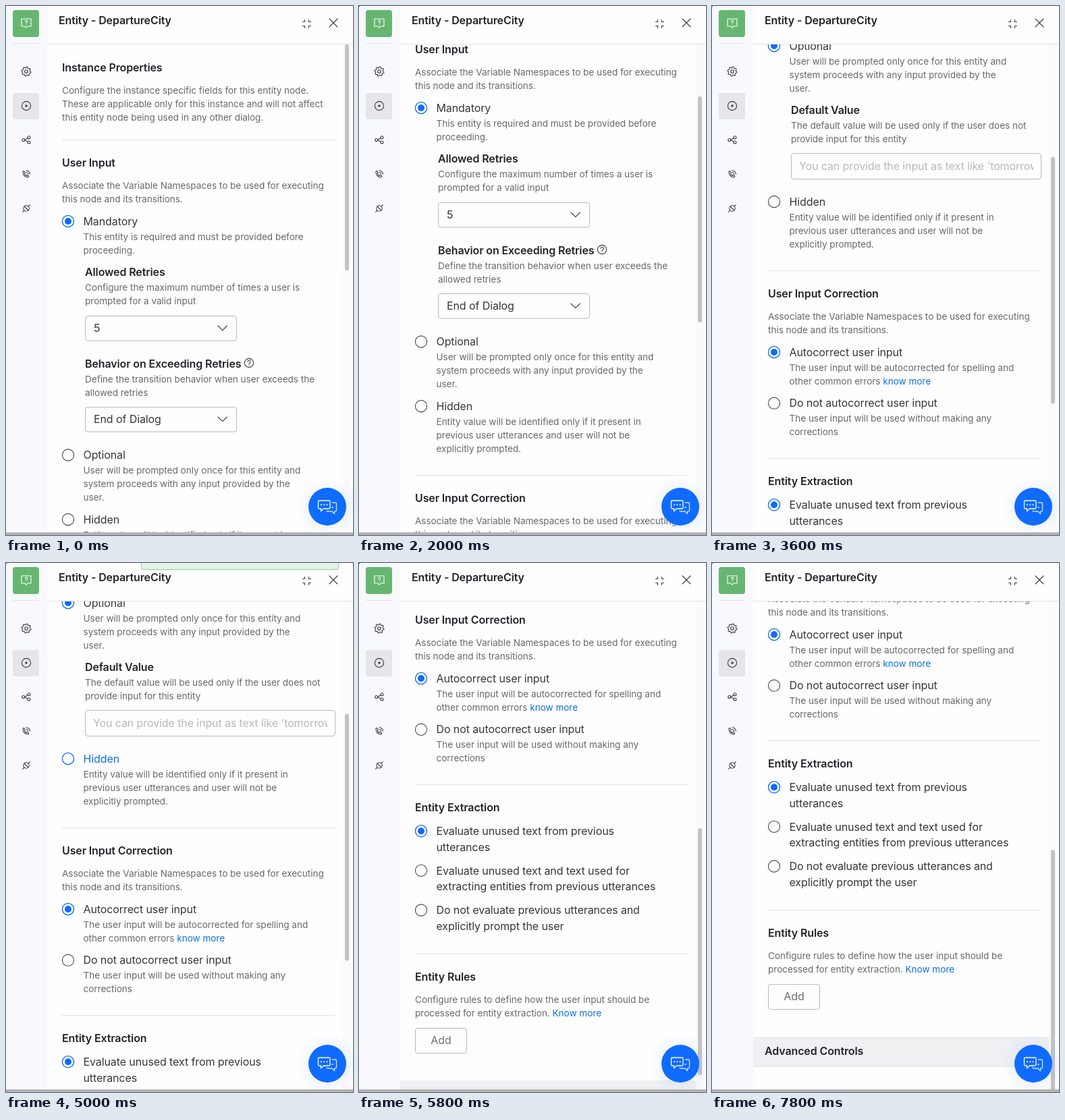
These frames come from a looping animation (514 by 784 pixels, 8 s). An HTML page:

```html
<!DOCTYPE html>
<html lang="en">
<head>
<meta charset="utf-8">
<title>Entity settings</title>
<style>
html, body { margin: 0; width: 100%; height: 100%; overflow: hidden; background: #fefefe; }
svg { display: block; width: 514px; height: 784px; }
text { font-family: Inter, "Open Sans", sans-serif; font-optical-sizing: none; white-space: pre; }
.head { font-size: 16px; font-weight: 600; letter-spacing: -.12px; fill: #232328; }
.label { font-size: 16px; letter-spacing: -.1px; fill: #36363b; }
.note { font-size: 13.6px; letter-spacing: -.045px; fill: #68686d; }
.hint { fill: #b8b8bb; }
.link { fill: #0d6fe8; }
.rule { stroke: #e2e2e5; }
.box { fill: #fefefe; stroke: #b9b9bd; }
.line { fill: none; stroke: #3b3b40; stroke-width: 1.1; stroke-linecap: round; stroke-linejoin: round; }
.ring { fill: #fefefe; stroke: #48484e; stroke-width: 1.1; }
.dot { fill: #0f6bff; visibility: hidden; }
.on .dot { visibility: visible; }
.on .ring, .hover .ring { stroke: #0f6bff; stroke-width: 1.3; }
.hover .label { fill: #0d6fe8; }
</style>
</head>
<body>
<svg id="stage" viewBox="0 0 514 784">
  <defs>
    <clipPath id="view"><rect x="61" y="57" width="453" height="723"/></clipPath>
    <clipPath id="field"><rect x="125" y="554" width="351" height="42"/></clipPath>
    <radialGradient id="glow">
      <stop offset=".55" stop-color="#3c82ff" stop-opacity=".07"/>
      <stop offset="1" stop-color="#3c82ff" stop-opacity="0"/>
    </radialGradient>
  </defs>
  <rect width="514" height="784" fill="#fefefe"/>
  <rect width="61" height="784" fill="#f8f9fd"/>
  <g clip-path="url(#view)">
    <g id="content"></g>
    <rect x="499" y="57" width="12" height="723" fill="#fafafa"/>
    <rect id="thumb" x="502" width="6" rx="3" fill="#c3c3c4"/>
  </g>
  <g id="side"></g>
  <g id="header"></g>
  <rect y="780" width="514" height="4" fill="#b4b4b6"/>
  <g id="chat"></g>
  <g id="toast">
    <rect x="199" y="-20" width="296" height="32" rx="4" fill="#5bb878" opacity=".1"/>
    <rect x="200.5" y="-20" width="292" height="29.5" rx="3" fill="#e3f5e7" stroke="#8ed3a0"/>
  </g>
  <rect id="speck" width="1" height="1" fill="#000"/>
</svg>
<script>
const LOOP = 8000;
const $ = id => document.getElementById(id);

function add(parent, tag, attrs = {}, text) {
  const el = document.createElementNS("http://www.w3.org/2000/svg", tag);
  for (const key in attrs) el.setAttribute(key, attrs[key]);
  if (text) el.textContent = text;
  return parent.appendChild(el);
}

const group = (parent, attrs) => add(parent, "g", attrs);
const line = (parent, d, attrs = {}) => add(parent, "path", { class: "line", d, ...attrs });

// Text is placed by the vertical middle of its capitals.
function write(parent, kind, x, mid, text) {
  return add(parent, "text", { class: kind, x, y: mid + (kind === "note" ? 5 : 5.7) }, text);
}

function notes(parent, x, mid, ...rows) {
  return rows.map((row, i) => write(parent, "note", x, mid + i * 20.2, row)).pop();
}

const link = (row, text) => add(row, "tspan", { class: "link" }, text);
const rule = (parent, y) => add(parent, "path", { class: "rule", d: `M83 ${y + .5}H487.5` });

function box(parent, x, y, width, height) {
  add(parent, "rect", { class: "box", x: x + .5, y: y + .5, width, height, rx: 3.5 });
}

function select(parent, y, text) {
  box(parent, 117, y, 224, 36.5);
  write(parent, "label", 130, y + 18.3, text);
  line(parent, `M314 ${y + 15}l6.7 6.7l6.7 -6.7`);
}

function radio(parent, y, ...rows) {
  const g = group(parent);
  add(g, "circle", { class: "ring", cx: 92, cy: y, r: 8.6 });
  add(g, "circle", { class: "dot", cx: 92, cy: y, r: 5 });
  rows.forEach((row, i) => write(g, "label", 114.5, y + i * 23.8, row));
  return g;
}

// Scrolled content
const content = $("content");
write(content, "head", 83, 91, "Instance Properties");
notes(content, 83, 124.5, "Configure the instance specific fields for this entity node.",
  "These are applicable only for this instance and will not affect",
  "this entity node being used in any other dialog.");
rule(content, 198);
write(content, "head", 83, 232, "User Input");
notes(content, 83, 266, "Associate the Variable Namespaces to be used for executing",
  "this node and its transitions.");
const mandatory = radio(content, 319, "Mandatory");
notes(content, 114.5, 342, "This entity is required and must be provided before", "proceeding.");

const retries = group(content);
write(retries, "head", 117, 394, "Allowed Retries");
notes(retries, 117, 417, "Configure the maximum number of times a user is", "prompted for a valid input");
select(retries, 459, "5");
write(retries, "head", 117, 530, "Behavior on Exceeding Retries");
add(retries, "circle", { class: "line", cx: 360, cy: 529, r: 6.6 });
line(retries, "M358 527.4a2.1 2.1 0 1 1 3 1.9q-1 .5 -1 1.6M360 532.6v.1");
notes(retries, 117, 552.5, "Define the transition behavior when user exceeds the", "allowed retries");
select(retries, 594, "End of Dialog");

const option = group(content);
const optional = radio(option, 665.5, "Optional");
notes(option, 114.5, 688, "User will be prompted only once for this entity and",
  "system proceeds with any input provided by the", "user.");

const preset = group(content);
write(preset, "head", 117, 490, "Default Value");
notes(preset, 117, 513, "The default value will be used only if the user does not",
  "provide input for this entity");
box(preset, 117, 554, 370, 38);
write(group(preset, { "clip-path": "url(#field)" }), "label hint", 129, 573.5,
  "You can provide the input as text like 'tomorrow'");

const tail = group(content);
const hidden = radio(tail, 761, "Hidden");
notes(tail, 114.5, 784, "Entity value will be identified only if it present in",
  "previous user utterances and user will not be", "explicitly prompted.");
rule(tail, 863);
write(tail, "head", 83, 897.5, "User Input Correction");
notes(tail, 83, 931, "Associate the Variable Namespaces to be used for executing",
  "this node and its transitions.");
radio(tail, 984, "Autocorrect user input").classList.add("on");
link(notes(tail, 114.5, 1006.5, "The user input will be autocorrected for spelling and",
  "other common errors "), "know more");
radio(tail, 1059.7, "Do not autocorrect user input");
notes(tail, 114.5, 1082, "The user input will be used without making any", "corrections");
rule(tail, 1141);
write(tail, "head", 83, 1175, "Entity Extraction");
radio(tail, 1210.3, "Evaluate unused text from previous", "utterances").classList.add("on");
radio(tail, 1268.8, "Evaluate unused text and text used for",
  "extracting entities from previous utterances");
radio(tail, 1327.5, "Do not evaluate previous utterances and", "explicitly prompt the user");
rule(tail, 1392);
write(tail, "head", 83, 1426, "Entity Rules");
link(notes(tail, 83, 1460, "Configure rules to define how the user input should be",
  "processed for entity extraction. "), "Know more");
box(tail, 83, 1502, 76, 37);
write(tail, "label", 121.5, 1520.5, "Add").setAttribute("style", "text-anchor:middle;fill:#707075");
add(tail, "rect", { x: 61, y: 1580, width: 438, height: 45, fill: "#f0f0f3" });
add(tail, "path", { class: "rule", d: "M61 1624.5H499" });
write(tail, "head", 78, 1601.3, "Advanced Controls");

// Header
const header = $("header");
write(header, "head", 78, 21.3, "Entity - DepartureCity");
add(header, "path", { class: "rule", d: "M61 56.5H514" });
line(header, "M439.5 23.5h3v-3M451.5 23.5h-3v-3M439.5 29.5h3v3M451.5 29.5h-3v3");
line(header, "M479 19l12 12M491 19l-12 12");

// Side icons
const side = $("side");
add(side, "rect", { x: 10, y: 6, width: 39, height: 40, rx: 4, fill: "#66b671" });
line(side, "M23 19h14v11h-5l-2 2.5l-2 -2.5h-5zM28.6 22.8a1.5 1.5 0 1 1 2.1 1.4q-.7 .3 -.7 1.2M30 27.5v.1",
  { style: "stroke:#fff" });
add(side, "path", { class: "rule", d: "M10 55.5H49" });

function gear(cx, cy) {
  const points = [];
  for (let i = 0; i < 32; i++) {
    const angle = (i + .5) * Math.PI / 16;
    const r = i % 4 < 2 ? 7 : 5.4;
    points.push(`${cx + r * Math.cos(angle)},${cy + r * Math.sin(angle)}`);
  }
  add(side, "polygon", { class: "line", points: points.join(" ") });
  add(side, "circle", { class: "line", cx, cy, r: 2.3 });
}
gear(30, 97);
add(side, "rect", { x: 10, y: 129, width: 39, height: 39, rx: 3, fill: "#e5e5ea" });
add(side, "circle", { class: "line", cx: 30, cy: 148, r: 6.6 });
add(side, "circle", { cx: 30, cy: 148, r: 1.7, fill: "#3b3b40" });
for (const [cx, cy] of [[25.8, 198.5], [34, 194.8], [34, 202]])
  add(side, "circle", { class: "line", cx, cy, r: 2 });
line(side, "M27.8 198q2.5 -.3 4.2 -2.6M27.8 199q2.5 .3 4.2 2.4");
// phone
line(side, "M25 245.3l1.7 -.9l1.5 2.6l-1 1.3q.9 2.2 2.7 3.2l1.3 -1l2.5 1.5l-.9 1.9q-7.8 -.3 -7.8 -8.6z");
line(side, "M30 246.5q2.4 .1 2.7 2.8M30 243.7q5 .3 5.4 5.6");
// plug
add(side, "circle", { class: "line", cx: 30, cy: 300, r: 4.2 });
line(side, "M27 297l6 6M27 303l-2.4 2.4M33 297l2.4 -2.4");

// Chat button
const chat = $("chat");
add(chat, "circle", { cx: 476, cy: 743, r: 47, fill: "url(#glow)" });
add(chat, "circle", { cx: 476, cy: 742, r: 28, fill: "#106bff" });
const white = { style: "stroke:#fff;stroke-width:1.3" };
line(chat, "M464 733h14.5q1.5 0 1.5 1.5v9q0 1.5 -1.5 1.5h-8l-4 3.8v-3.8h-2.5q-1.5 0 -1.5 -1.5v-9q0 -1.5 1.5 -1.5z", white);
line(chat, "M483.5 736h4.5q1.5 0 1.5 1.5v10q0 1.5 -1.5 1.5h-1.5v3.5l-3.7 -3.5h-6.3q-1.5 0 -1.5 -1",
  { ...white, opacity: .8 });
line(chat, "M467 739.3h.1M471.3 739.3h.1M475.6 739.3h.1M483.5 743h.1", { style: "stroke:#fff;stroke-width:2" });

// Scroll jumps as [time, offset]
const jumps = [[0, 0], [800, 168], [3600, 336], [5800, 678], [7600, 743]];
const between = (t, from, to) => t >= from && t < to;
const show = (el, on) => el.setAttribute("visibility", on ? "visible" : "hidden");
const move = (el, y) => el.setAttribute("transform", `translate(0 ${y})`);

function draw(t) {
  const scroll = jumps.filter(([start]) => start <= t).pop()[1];
  const chosen = t >= 3600;
  move(content, -scroll);
  move(option, chosen ? -270.5 : 0);
  move(tail, chosen ? -135 : 0);
  show(retries, !chosen);
  show(preset, chosen);
  mandatory.classList.toggle("on", !chosen);
  optional.classList.toggle("on", chosen);
  optional.classList.toggle("hover", between(t, 2400, 3600));
  hidden.classList.toggle("hover", between(t, 5000, 5800));
  $("thumb").setAttribute("y", 57 + scroll * (chosen ? .4955 : .458));
  $("thumb").setAttribute("height", chosen ? 366 : 335);
  show($("toast"), between(t, 4400, 5800));
  show($("speck"), t >= 200);
}

const begin = performance.now();
function tick() {
  draw((performance.now() - begin) % LOOP);
  requestAnimationFrame(tick);
}
tick();
</script>
</body>
</html>
```
